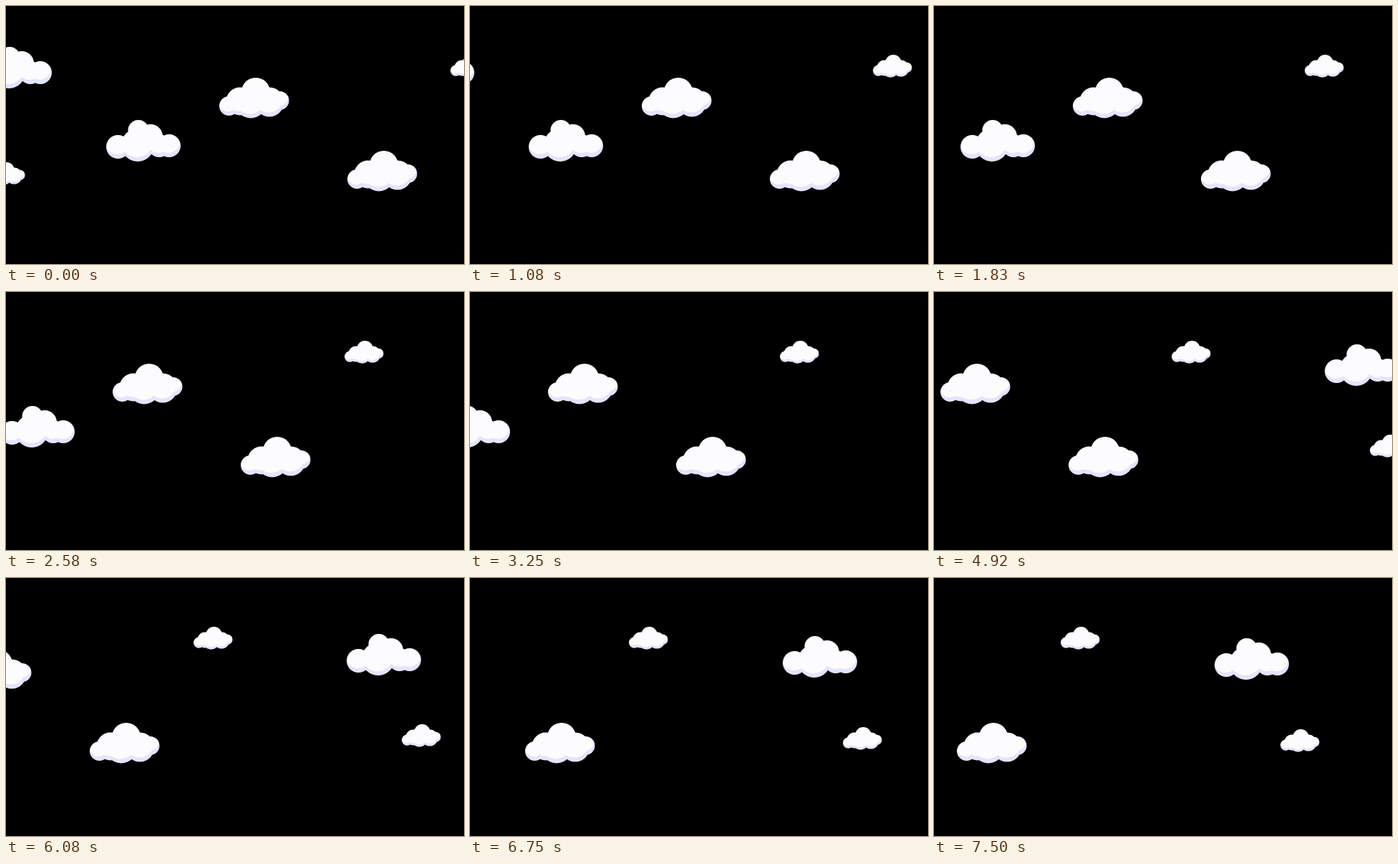
Animation, 640 px wide and 360 px high, one loop 7.58 s. Source, as an HTML page with a canvas:

```html
<!DOCTYPE html>
<html>
<head>
<meta charset="utf-8">
<style>
  html, body { margin: 0; height: 100%; overflow: hidden; background: #000; }
  canvas { display: block; }
</style>
</head>
<body>
<canvas id="stage" width="640" height="360"></canvas>
<script>
const LOOP = 7580;
const FRAMES = 91;
const ctx = document.getElementById('stage').getContext('2d');

// The union of all lobes in shade, with a raised copy as the lit part.
function makeCloud(lobes, scale = 1) {
  const sprite = document.createElement('canvas');
  sprite.width = 108;
  sprite.height = 60;
  const c = sprite.getContext('2d');
  c.scale(scale, scale);
  const paint = (color, dx, dy) => {
    c.fillStyle = color;
    c.beginPath();
    for (const [x, y, r] of lobes) {
      c.moveTo(x + dx + r, y + dy);
      c.arc(x + dx, y + dy, r, 0, 2 * Math.PI);
    }
    c.fill();
  };
  paint('#e4e4fc', 0, 0);
  c.globalCompositeOperation = 'source-atop';
  paint('#fcfcff', -1, -6);
  return sprite;
}

const tallLobes = [
  [13.5, 39.5, 13.5], [29, 33, 19.5], [51, 20, 20], [44, 35, 21.5], [70, 34, 20.5], [84.5, 32, 13]
];
const tall = makeCloud(tallLobes);
const small = makeCloud(tallLobes, 0.56);
const wide = makeCloud([
  [16.5, 37.5, 16.5], [45, 14.5, 14.5], [44, 35, 23], [62, 23, 17], [74, 36, 16], [88, 36, 16]
]);

// Steady drift after a soft start, in pixels.
const travel = k => 5.02 * k - 7.3 * (1 - Math.exp(-k / 2.4));

function drift(k, sprite, x, y, speed = 1, sink = 0) {
  ctx.drawImage(sprite, Math.round(x - speed * travel(k)), Math.round(y + sink * k));
}

function draw(t) {
  const k = Math.floor((Math.floor(t / 10) + 0.5) * 10 * FRAMES / LOOP);
  ctx.fillStyle = '#000';
  ctx.fillRect(0, 0, 640, 360);
  drift(k, wide, -40, 57);
  drift(k, wide, 140, 159);
  drift(k, wide, 832, 52, 0.99, 0.36);
  drift(k, tall, 297.5, 100);
  drift(k, tall, 476.5, 202);
  drift(k, small, -28, 218);
  drift(k, small, 621, 68);
  drift(k, small, 840, 176, 0.8, 0.39);
}

const start = performance.now();
function tick() {
  draw((performance.now() - start) % LOOP);
  requestAnimationFrame(tick);
}
tick();
</script>
</body>
</html>
```
